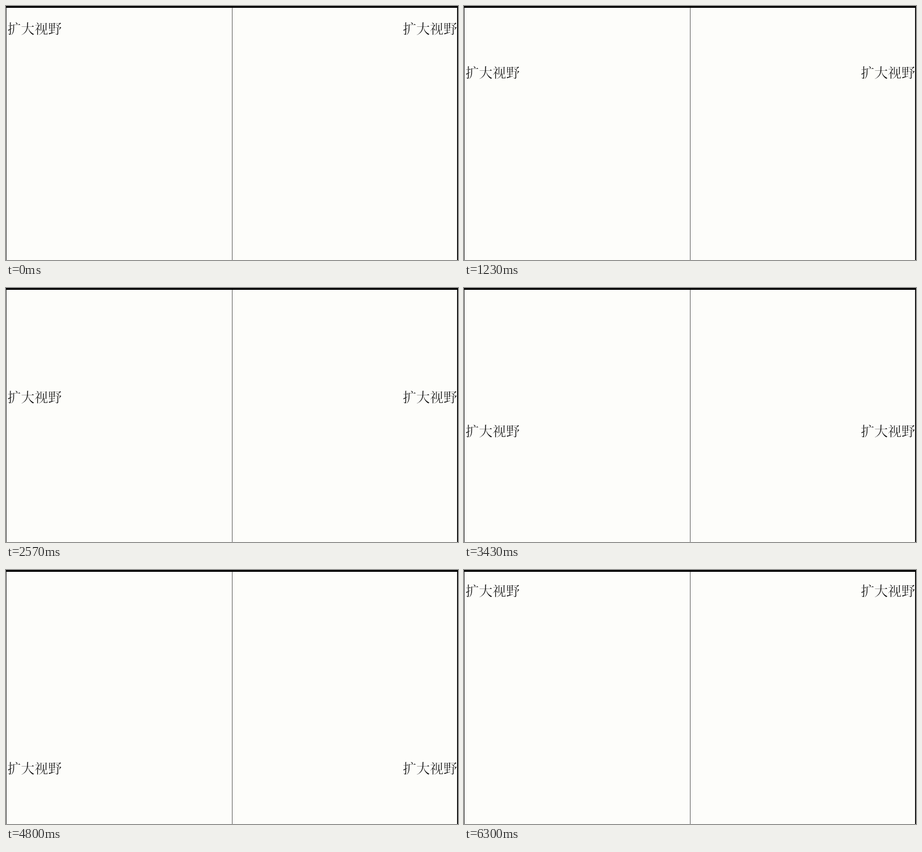
Write an HTML page that moves like this. It is 998 px wide and 561 px high and loops after 6.33 s.

```html
<!DOCTYPE html>
<html lang="zh-CN">
<head>
<meta charset="utf-8">
<style>
  html, body { margin: 0; width: 100%; height: 100%; overflow: hidden; background: #000; }
  svg { display: block; width: 998px; height: 561px; }
  /* The paper-coloured outline thins the strokes. */
  text {
    font: 200 30px "Noto Serif CJK SC", "Noto Sans CJK SC", "Noto Sans CJK", sans-serif;
    stroke: #fdfdfa; stroke-width: .35px;
  }
</style>
</head>
<body>
<svg viewBox="0 0 998 561">
  <rect x="1" y="4" width="995" height="557" fill="#fdfdfa"/>
  <rect x="499" y="4" width="1" height="557" fill="#333"/>
  <g id="words">
    <text x="3" y="11">扩大视野</text>
    <text x="876" y="11">扩大视野</text>
  </g>
</svg>
<script>
  const LOOP = 6330, RESTART = 6300;
  // Key poses: [time in ms, vertical centre of the words]
  const poses = [[0, 50], [730, 105], [1770, 192], [2570, 241], [4270, 390], [RESTART, 572]];
  const words = document.getElementById("words");

  function centreAt(t) {
    if (t >= RESTART) return 46;
    const i = poses.findIndex(([time]) => time > t);
    const [t0, y0] = poses[i - 1], [t1, y1] = poses[i];
    return y0 + (y1 - y0) * (t - t0) / (t1 - t0);
  }

  function draw() {
    const y = Math.round(centreAt(performance.now() % LOOP));
    words.setAttribute("transform", `translate(0 ${y})`);
    requestAnimationFrame(draw);
  }
  draw();
</script>
</body>
</html>
```
